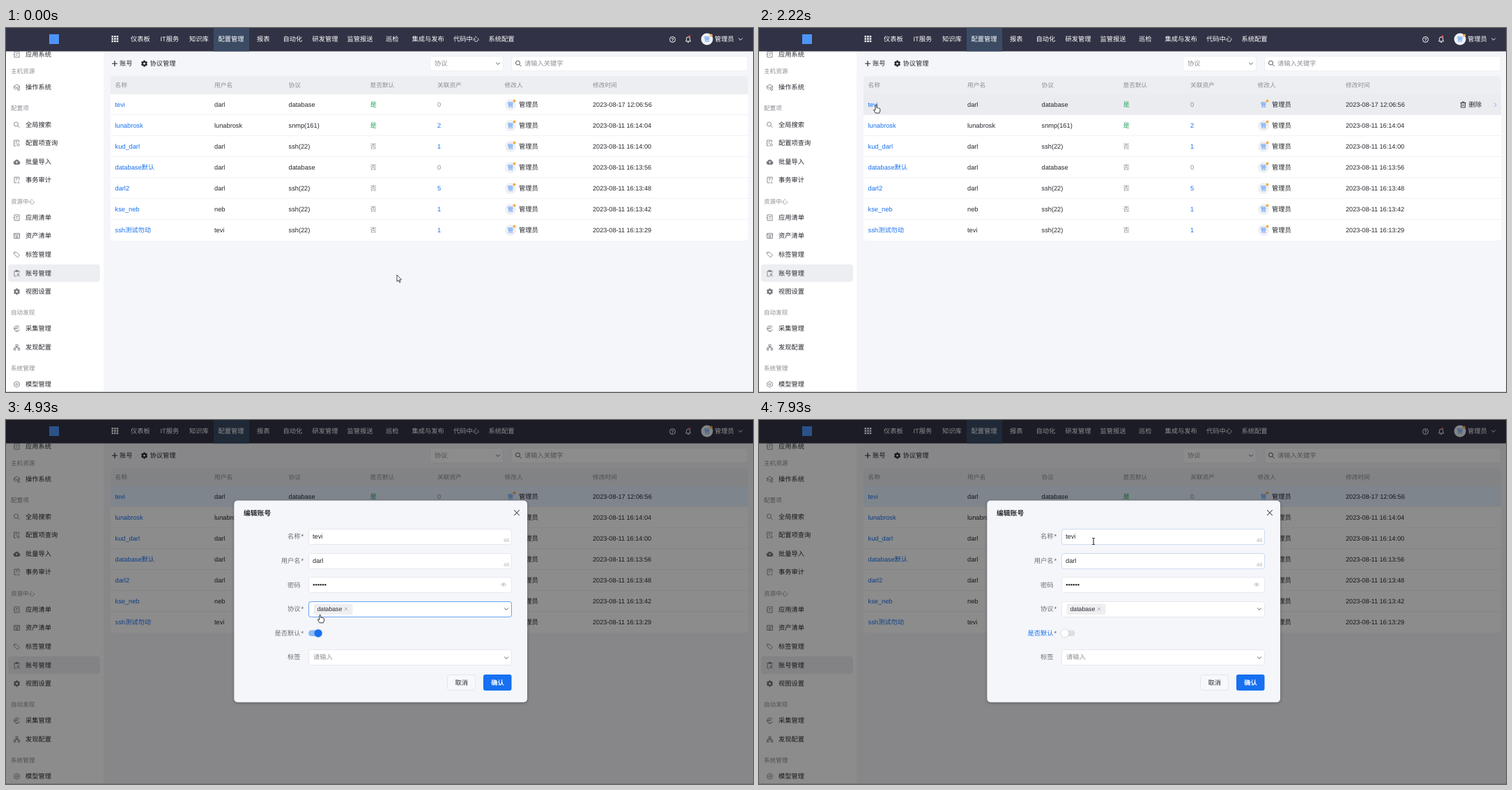
An HTML page with a canvas that plays this animation: 1072 px wide and 522 px high, repeating every 8000 ms.

```html
<!DOCTYPE html>
<html lang="zh-CN">
<head>
<meta charset="utf-8">
<style>
html, body { margin: 0; width: 100%; height: 100%; overflow: hidden; background: #f5f6fa; }
canvas { display: block; }
</style>
</head>
<body>
<canvas id="stage" width="1072" height="522"></canvas>
<script>
const c = document.getElementById('stage').getContext('2d');
const LOOP = 8000, OPEN = 2360, FILL = 2440, CLICK = 5700;
const BLUE = '#1670f0', INK = '#26282e', GREY = '#8c8e94', ICON = '#74767c';
const clamp = v => Math.max(0, Math.min(1, v));

function text(s, x, y, color = INK, size = 9.25, weight = 400, align = 'left') {
  c.font = `${weight} ${size}px "Liberation Sans", "Noto Sans CJK SC", "Noto Sans CJK", sans-serif`;
  c.textAlign = align;
  c.fillStyle = color;
  c.fillText(s, x, y + size * 0.37);
}
function box(x, y, w, h, r, fill, stroke) {
  c.beginPath();
  c.roundRect(x, y, w, h, r);
  if (fill) { c.fillStyle = fill; c.fill(); }
  if (stroke) { c.strokeStyle = stroke; c.lineWidth = 1; c.stroke(); }
}
function dot(x, y, r, fill) {
  c.beginPath();
  c.arc(x, y, r, 0, 7);
  c.fillStyle = fill;
  c.fill();
}
function shape(d, x, y, stroke, width = 1, fill) {
  const p = new Path2D(d);
  c.save();
  c.translate(x, y);
  if (fill) { c.fillStyle = fill; c.fill(p); }
  if (stroke) { c.strokeStyle = stroke; c.lineWidth = width; c.stroke(p); }
  c.restore();
}

// Icons, centred on 0,0
const I = {
  doc: 'M-3.5 -4H3.5V4H-3.5ZM-1.5 -1.5H2M-1.5 1H1M-5 0H-3',
  disk: 'M-4 -1.5L0 -4L4 -1.5L0 1ZM-4 -1.5V1.5L-1 3.5M0 1V2M4 -1.5V1M1 3A1.5 1.5 0 1 0 4 3A1.5 1.5 0 1 0 1 3',
  search: 'M-4 -1A3 3 0 1 0 2 -1A3 3 0 1 0 -4 -1M1.2 1.2L4 4',
  query: 'M3 -1V-4H-4V4H-1M-2 -2H1M-2 0H0M0.5 2.5A1.6 1.6 0 1 0 3.7 2.5A1.6 1.6 0 1 0 0.5 2.5',
  cloud: 'M-2.5 3.5A2.3 2.3 0 0 1 -2.8 -1A3 3 0 0 1 2.8 -1A2.3 2.3 0 0 1 2.5 3.5Z',
  audit: 'M3.5 0V-4H-3.5V4H0M-1.5 -2H1.5M-1.5 0H0M2.5 1V2.5M1 4H4',
  list: 'M-4 -3.5H4V3.5H-4ZM-4 -1.3H4M-2 0.6H2M-2 2.2H2',
  tag: 'M-4 -3.5H-0.5L4 1L1 4L-4 -0.8ZM-2.2 -1.8H-1.6',
  user: 'M3.5 -1V-3.5H-3.5V4H-1M-1.5 -4.5H1.5V-2.5H-1.5ZM0.8 1.2A1.2 1.2 0 1 0 3.2 1.2A1.2 1.2 0 1 0 0.8 1.2M0 4.3L1 2.8H3L4 4.3',
  at: 'M4 1A4 4 0 1 1 3.7 -1.8M-4 0.5H1M1.5 0A1.6 1.6 0 1 0 -1.6 0M-2 3.5H2',
  tree: 'M-1.5 -4H1.5V-1.5H-1.5ZM0 -1.5V1M-3 1.5V0H3V1.5M-4.2 1.5H-1.8V4H-4.2ZM1.8 1.5H4.2V4H1.8Z',
  hex: 'M0 -4.3L3.7 -2.1V2.1L0 4.3L-3.7 2.1V-2.1ZM-1.4 0A1.4 1.4 0 1 0 1.4 0A1.4 1.4 0 1 0 -1.4 0',
  down: 'M-2.8 -1.4L0 1.4L2.8 -1.4',
  cross: 'M-1 -1L1 1M1 -1L-1 1',
  bin: 'M-4 -2.6H4M-1.5 -2.8V-4H1.5V-2.8M-3 -2.6V4H3V-2.6M-1 -0.6V2M1 -0.6V2',
  bell: 'M-3.5 2.5L-2.6 1V-1A2.6 2.6 0 0 1 2.6 -1V1L3.5 2.5ZM-1 4H1',
  eye: 'M-3.5 0Q0 -4 3.5 0Q0 4 -3.5 0Z'
};
function gear(x, y, color, hole) {
  c.save();
  c.translate(x, y);
  c.fillStyle = color;
  for (let k = 0; k < 3; k++, c.rotate(Math.PI / 3)) c.fillRect(-1.3, -4.5, 2.6, 9);
  c.restore();
  dot(x, y, 3.3, color);
  dot(x, y, 1.5, hole);
}

const SIDE = [
  [38, '应用系统', 'doc'], [62, '主机资源'], [85, '操作系统', 'disk'], [115, '配置项'],
  [139, '全局搜索', 'search'], [165, '配置项查询', 'query'], [192, '批量导入', 'cloud'], [218, '事务审计', 'audit'],
  [249, '资源中心'], [272, '应用清单', 'doc'], [298, '资产清单', 'list'], [325, '标签管理', 'tag'],
  [352, '账号管理', 'user'], [378, '视图设置', 'gear'], [408, '自动发现'], [431, '采集管理', 'at'],
  [458, '发现配置', 'tree'], [488, '系统管理'], [511, '模型管理', 'hex']
];
const NAV = [
  [179, '仪表板'], [221.5, 'IT服务'], [263, '知识库'], [304.5, '配置管理'], [360, '报表'], [397.5, '自动化'],
  [439.5, '研发管理'], [489.5, '监管报送'], [545, '巡检'], [582.5, '集成与发布'], [642, '代码中心'], [692.5, '系统配置']
];
const COLS = [156.5, 299, 405.5, 522.5, 619, 715.5, 842];
const HEADS = ['名称', '用户名', '协议', '是否默认', '关联资产', '修改人', '修改时间'];
const ROWS = [
  ['tevi', 'darl', 'database', '是', 0, '17 12:06:56'],
  ['lunabrosk', 'lunabrosk', 'snmp(161)', '是', 2, '11 16:14:04'],
  ['kud_darl', 'darl', 'ssh(22)', '否', 1, '11 16:14:00'],
  ['database默认', 'darl', 'database', '否', 0, '11 16:13:56'],
  ['darl2', 'darl', 'ssh(22)', '否', 5, '11 16:13:48'],
  ['kse_neb', 'neb', 'ssh(22)', '否', 1, '11 16:13:42'],
  ['ssh测试勿动', 'tevi', 'ssh(22)', '否', 1, '11 16:13:29']
];

// Pointer route: time, x, y
const ROUTE = [
  [420, 561, 354], [720, 403, 200], [800, 403, 200], [1260, 195, 113], [1290, 195, 113], [1640, 168, 110],
  [3060, 168, 110], [3360, 343, 136], [3600, 343, 136], [3860, 448, 163], [4030, 453, 177], [4080, 454, 202],
  [4140, 454, 202], [4440, 453, 248], [4480, 453, 248], [4800, 456, 270], [5170, 441, 295], [5280, 441, 295],
  [5490, 442, 303], [5780, 442, 303], [6060, 540, 320], [6180, 572, 338], [6250, 572, 338], [6490, 655, 374],
  [6510, 655, 374], [6720, 703, 374], [7290, 703, 374], [7800, 500, 180], [7930, 480, 174]
];
function pointer(t) {
  const n = ROUTE.findIndex(p => p[0] > t);
  if (n === 0) return ROUTE[0].slice(1);
  if (n < 0) return ROUTE[ROUTE.length - 1].slice(1);
  const a = ROUTE[n - 1], b = ROUTE[n], k = (t - a[0]) / (b[0] - a[0]);
  return [a[1] + (b[1] - a[1]) * k, a[2] + (b[2] - a[2]) * k];
}
const inside = ([px, py], [x, y, w, h]) => px >= x && px <= x + w && py >= y && py <= y + h;
// Hover reacts after 60 ms and fades over 200 ms
function hover(r, t) {
  let n = 0;
  for (let k = 0; k < 10; k++) n += inside(pointer(t - 60 - k * 20), r);
  return n / 10;
}

const FIELDS = [167, 202, 236, 271, 340].map(y => [434.5, y - 10.5, 291, 22]);
const SWITCH = [434, 300, 20, 12], CANCEL = [633.5, 365.5, 40, 22], OK = [685, 365, 40.5, 23];
const LINK = [156, 105, 17, 11];

function header() {
  box(0, 0, 1072, 33.5, 0, '#313245');
  box(298, 0, 51, 33.5, 0, '#3b4b64');
  box(62, 9, 14, 14, 0, '#4d94f7');
  for (let k = 0; k < 9; k++) box(151.5 + k % 3 * 3.6, 11 + Math.floor(k / 3) * 3.4, 2.5, 2.4, 0, '#fff');
  NAV.forEach(([x, s]) => text(s, x, 16, '#fff'));
  c.beginPath();
  c.arc(956.5, 16.5, 4, 0, 7);
  c.strokeStyle = '#fff';
  c.lineWidth = 1;
  c.stroke();
  text('?', 956.5, 16.5, '#fff', 6.5, 700, 'center');
  shape(I.bell, 979, 16.5, '#fff');
  dot(981, 12, 1.6, '#f0484a');
  dot(1006, 16, 8.5, '#eef0f5');
  text('管', 1006, 16, '#3b8bf5', 8.5, 500, 'center');
  dot(1012, 10.5, 2, '#f3ad45');
  text('管理员', 1017, 16, '#fff');
  shape(I.down, 1054, 16, '#fff');
}

function sidebar() {
  box(0, 33, 140, 489, 0, '#fff');
  box(3, 339, 132, 25, 4, '#edeef2');
  for (const [y, s, icon] of SIDE) {
    if (!icon) { text(s, 7, y, GREY, 8.6); continue; }
    text(s, 28, y);
    if (icon === 'gear') gear(15.5, y, ICON, '#fff');
    else shape(I[icon], 15.5, y, ICON, 0.85, icon === 'cloud' && ICON);
    if (icon === 'cloud') shape('M0 2.5V-0.8M-1.5 0.6L0 -1L1.5 0.6', 15.5, y, '#fff', 0.9);
  }
}

function table(active, opened) {
  shape('M-4 0H4M0 -4V4', 156, 51, INK, 1.2);
  text('账号', 163, 51);
  gear(198.5, 51, INK, '#f5f6fa');
  text('协议管理', 206.5, 51);
  box(608.5, 40.5, 105, 21, 3, '#fff', '#eceef2');
  text('协议', 615, 50.5, GREY);
  shape(I.down, 706, 51, '#555', 1);
  box(725.5, 40.5, 339, 21, 3, '#fff', '#eceef2');
  shape(I.search, 735.5, 51, '#555', 1);
  text('请输入关键字', 744, 51, GREY);

  box(150, 69, 915, 236, 5, '#fff');
  box(150, 69, 915, 26, [5, 5, 0, 0], '#eceef1');
  HEADS.forEach((s, k) => text(s, COLS[k], 82, GREY, 8.7));
  ROWS.forEach(([name, user, proto, yes, count, time], k) => {
    const y = 110 + 30 * k, on = k === active;
    if (k) box(150, y - 16, 915, 1, 0, '#f1f2f5');
    if (on) box(150, y - 15, 915, 30, 0, opened ? '#e6f1ff' : '#ebecf0');
    text(name, COLS[0], y, BLUE);
    text(user, COLS[1], y);
    text(proto, COLS[2], y);
    text(yes, COLS[3], y, yes === '是' ? '#27a45f' : GREY);
    text(count, COLS[4], y, count ? BLUE : GREY);
    if (!on) dot(724, y, 8, '#eff0f4');
    text('管', 724, y, '#3b8bf5', 8.5, 500, 'center');
    dot(729.5, y - 5.5, 2, '#f3ad45');
    text('管理员', 736, y);
    text('2023-08-' + time, COLS[6], y, INK, 9.15);
    if (on && !opened) {
      shape(I.bin, 1010.5, y, INK, 0.9);
      text('删除', 1018.5, y);
      shape('M-1.5 -3L1.5 0L-1.5 3', 1056.5, y, '#7fb0f5');
    }
  });
}

function dialog(t) {
  const filled = t >= FILL;
  c.save();
  c.shadowColor = `rgba(0,0,0,${0.3 * clamp((t - 3130) / 230)})`;
  c.shadowBlur = 4;
  c.shadowOffsetY = 1;
  box(327.3, 115.5, 420.7, 289.3, 5, '#f5f6fa');
  c.restore();
  text('编辑账号', 341, 133, INK, 9.8, 700);
  c.save();
  c.translate(733, 133);
  c.scale(3.8, 3.8);
  shape(I.cross, 0, 0, '#55575c', 0.28);
  c.restore();

  const label = (s, y, star, color = '#6c6e75') => {
    text(s, 422.5, y, color, 9.25, 400, 'right');
    if (star) text('*', 423.5, y, '#55575c');
  };
  label('名称', 167, 1);
  label('用户名', 202, 1);
  label('密码', 236.5);
  label('协议', 271, 1);
  label('是否默认', 306, 1, t >= CLICK ? BLUE : undefined);
  label('标签', 340);

  for (const f of FIELDS) {
    box(...f, 3, '#fff', '#e6e8ed');
    c.globalAlpha = hover(f, t) * 0.75;
    box(...f, 3, null, '#3f8cf5');
    c.globalAlpha = 1;
  }
  ['tevi', 'darl'].forEach((s, k) => {
    const y = [167, 202][k];
    text(filled ? s : '请输入', 440, y, filled ? INK : GREY);
    text(filled ? 46 : 50, 722.5, y + 5.5, '#b0b2b8', 7.6, 400, 'right');
  });
  if (filled) for (let k = 0; k < 6; k++) dot(441.8 + 3.3 * k, 236.2, 1.25, INK);
  else text('请输入', 440, 236, GREY);
  shape(I.eye, 714, 236, '#b4b6bb', 0.9);
  dot(714, 236, 1.1, '#b4b6bb');
  if (filled) {
    box(441.5, 263.5, 56, 15.5, 2, '#efeff1');
    text('database', 446.5, 271, INK, 8.7);
    c.save();
    c.translate(488, 271);
    c.scale(2.2, 2.2);
    shape(I.cross, 0, 0, '#9a9ca2', 0.35);
    c.restore();
  } else text('请选择协议', 441, 270.5, GREY);
  text('请输入', 441, 340, GREY);
  for (const y of [271, 341]) shape(I.down, 718, y, '#55575c');

  const on = clamp((t - FILL) / 200) - clamp((t - CLICK) / 200);
  box(434, 301.5, 19.5, 8.5, 4.25, '#dddfe4');
  c.globalAlpha = on;
  box(434, 301.5, 19.5, 8.5, 4.25, '#8fbaf8');
  c.globalAlpha = 1;
  c.save();
  c.shadowColor = 'rgba(0,0,0,.25)';
  c.shadowBlur = 2;
  dot(439 + 9 * on, 305.8, 5.6, '#fff');
  c.restore();
  c.globalAlpha = on;
  dot(439 + 9 * on, 305.8, 5.6, BLUE);
  c.globalAlpha = 1;

  box(...CANCEL, 3, '#f7f8fb', '#e4e6eb');
  text('取消', 653.8, 377, INK, 9.25, 400, 'center');
  c.globalAlpha = hover(CANCEL, t);
  box(...CANCEL, 3, null, '#4f94f5');
  text('取消', 653.8, 377, BLUE, 9.25, 400, 'center');
  c.globalAlpha = 1;
  box(...OK, 3, BLUE);
  c.globalAlpha = hover(OK, t) * 0.15;
  box(...OK, 3, '#fff');
  c.globalAlpha = 1;
  text('确认', 705.5, 377, '#fff', 9.25, 700, 'center');
}

function cursor(p, opened) {
  const hits = list => list.some(r => inside(p, r));
  const typing = opened && hits(FIELDS.slice(0, 3));
  const hand = opened ? hits([...FIELDS.slice(3), SWITCH, CANCEL, OK]) : hits([LINK]);
  if (typing) shape('M-1.8 -4.5H-0.5L0 -4L0.5 -4.5H1.8M0 -4V4M-1.8 4.5H-0.5L0 4L0.5 4.5H1.8', ...p, '#111', 1);
  else if (hand) shape('M-1 1Q0 -0.6 1 1V4.5Q2 3.8 2.7 4.8Q3.8 4.3 4.3 5.3Q5.8 5 5.8 6.6V9L4.6 12H-0.6L-3.4 7.8Q-3.4 6.2 -1 7.8Z', ...p, '#222', 0.9, '#fff');
  else shape('M0 0V9.6L2.2 7.6L3.7 11L5.1 10.4L3.6 7.1H6.6Z', ...p, '#222', 0.8, '#fff');
}

function draw(now) {
  const t = now % LOOP, p = pointer(t), opened = t >= OPEN;
  c.textRendering = 'geometricPrecision';
  box(0, 0, 1072, 522, 0, '#f5f6fa');
  sidebar();
  const over = inside(p, [150, 95, 915, 209.9]) ? Math.floor((p[1] - 95) / 30) : -1;
  table(opened ? 0 : over, opened);
  header();
  box(0, 521, 1072, 1, 0, '#d3d4da');
  if (opened) {
    box(0, 0, 1072, 522, 0, 'rgba(0,0,0,.45)');
    dialog(t);
  }
  cursor(p, opened);
  requestAnimationFrame(draw);
}
requestAnimationFrame(draw);
</script>
</body>
</html>
```
